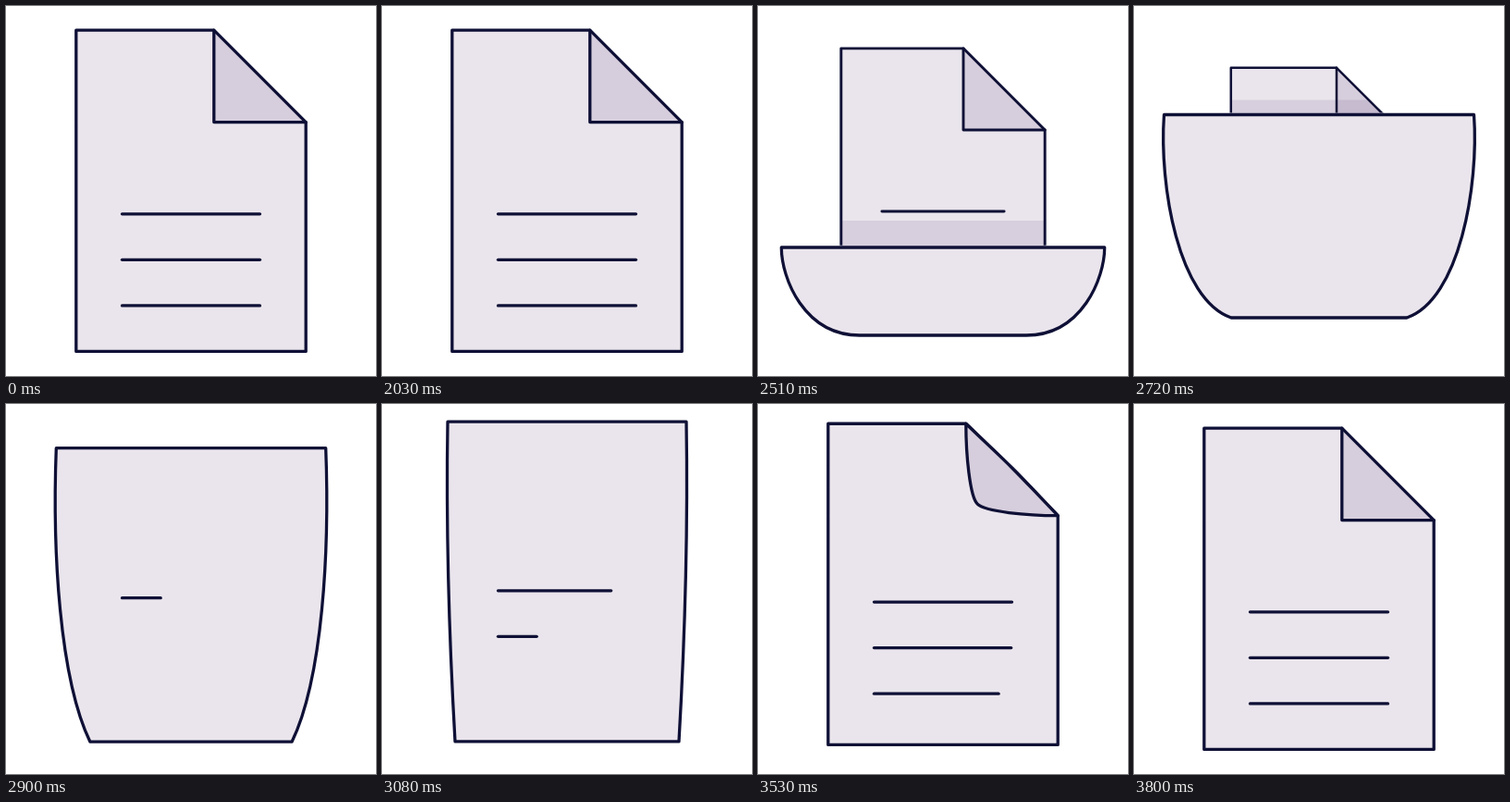
Animation, 400 px wide and 400 px high, one loop 3.83 s. Source, as an HTML page with a canvas:

```html
<!DOCTYPE html>
<html>
<head>
<meta charset="utf-8">
<style>
html, body { margin: 0; width: 100%; height: 100%; overflow: hidden; background: #fff; }
canvas { display: block; width: 400px; height: 400px; }
</style>
</head>
<body>
<canvas id="stage"></canvas>
<script>
const LOOP = 3830, START = 2030, STEP = 30;
const INK = '#0f1036', PAPER = '#eae5ec', FOLD = '#d6cedc', SHADE = 'rgba(100,70,130,.14)';
const CORNER = 99.4, TOP = 26.2, BOTTOM = 373.4, HALF = 124.2;

const canvas = document.getElementById('stage');
const ctx = canvas.getContext('2d');
const dpr = window.devicePixelRatio || 1;
canvas.width = canvas.height = 400 * dpr;

// Smooth track through [time, value] keys that never overshoots them.
function track(...keys) {
  const slope = i => (keys[i + 1][1] - keys[i][1]) / (keys[i + 1][0] - keys[i][0]);
  const tangent = keys.map((k, i) => {
    if (!i || i === keys.length - 1) return 0;
    const a = slope(i - 1), b = slope(i);
    return a * b <= 0 ? 0 : 2 * a * b / (a + b);
  });
  return t => {
    const last = keys.length - 1;
    if (t <= keys[0][0]) return keys[0][1];
    if (t >= keys[last][0]) return keys[last][1];
    let i = 0;
    while (t > keys[i + 1][0]) i++;
    const h = keys[i + 1][0] - keys[i][0], u = (t - keys[i][0]) / h, v = 1 - u;
    return keys[i][1] * (1 + 2 * u) * v * v + keys[i + 1][1] * (3 - 2 * u) * u * u
      + h * u * v * (tangent[i] * v - tangent[i + 1] * u);
  };
}

// Free edge and bottom of the turning sheet
const edgeY = track([2030, 373.4], [2150, 380], [2510, 261], [2720, 117.5], [2860, 57], [3080, 19.2],
  [3200, 11.2], [3320, 13.3], [3620, 23.9], [3800, TOP]);
const edgeHalf = track([2030, 124.2], [2150, 131], [2510, 174.7], [2620, 178], [2720, 167.5], [3080, 129], [3230, HALF]);
const footY = track([2030, 373.4], [2330, 371], [2510, 356], [2640, 341], [2720, 337], [2850, 356], [2970, 373.5],
  [3080, 364.8], [3200, 358.4], [3320, 360.4], [3620, 371.1], [3800, BOTTOM]);
const footHalf = track([2030, 124.2], [2330, 102], [2510, 90], [2600, 89], [2720, 95], [3080, 121], [3230, HALF]);
const bulgeTop = track([2510, 0], [2720, 5.5], [3080, 2], [3230, 0]);
const bulgeFoot = track([2030, 0], [2510, 60], [2720, 57], [3080, 6], [3230, 0]);
const lift = track([2510, 0], [2720, .09], [3080, .3]);
const shadow = track([2030, 0], [2300, 22], [2500, 29], [2720, 16], [2980, 0]);
// Corner: outline position and the tip folding over it
const outline = track([3110, 0], [3320, .46], [3440, .8], [3560, 1]);
const tip = track([3320, .46], [3440, 1.15], [3530, 1.75], [3620, 2]);
// Text rules
const grow = track([0, 0], [60, .08], [120, .28], [180, .445], [300, .82], [360, .88], [540, .99], [640, 1]);
const ruleShift = track([2780, -12], [3080, -23], [3220, -26], [3320, -25], [3620, -5], [3800, 0]);
const RULES = [224.8, 274.3, 323.9];

function rule(y, part) {
  ctx.beginPath();
  ctx.moveTo(125.5, y);
  ctx.lineTo(125.5 + 149 * part, y);
  ctx.stroke();
}

function paint(fill) {
  ctx.fillStyle = fill;
  ctx.fill();
  ctx.stroke();
}

function clipAbove(y, draw) {
  ctx.save();
  ctx.beginPath();
  ctx.rect(-200, -200, 800, y + 200);
  ctx.clip();
  draw();
  ctx.restore();
}

// Seven points from the top edge to the right edge; q: 0 is square, 1 is cut, 2 is folded in.
function cornerPoints(q, x, y) {
  const flip = q > 1, s = flip ? 2 - q : q, mid = CORNER / 2 * s;
  const k = 16.6 * Math.min(1, s * 2);
  const half = [[CORNER, 0], [CORNER - 33.1, 33.1 * Math.max(0, (s - .46) / .54)], [mid + k, mid - k], [mid, mid]];
  const all = half.concat(half.slice(0, 3).reverse().map(([a, b]) => [b, a]));
  return all.map(([a, b]) => flip ? [x - CORNER + b, y + CORNER - a] : [x - a, y + b]);
}

function curve(p) {
  for (let i = 1; i < 7; i += 3) ctx.bezierCurveTo(...p[i], ...p[i + 1], ...p[i + 2]);
}

function drawPage(t) {
  const dt = Math.max(0, t - START), s = 1 - .113 * (dt / 480) ** 2;
  const edge = edgeY(t), turned = edge < footY(t) - 2;
  const toLocal = y => 200 + (y - 200) / s;
  const low = dt ? toLocal(edge) : BOTTOM, wide = dt ? edgeHalf(t) / s : HALF;
  const bend = Math.min(80, dt * .28);

  function shape() {
    ctx.beginPath();
    ctx.moveTo(200 + HALF - CORNER, TOP);
    ctx.lineTo(200 - HALF, TOP);
    if (turned) {
      ctx.lineTo(200 - HALF, BOTTOM);
      ctx.lineTo(200 + HALF, BOTTOM);
    } else {
      ctx.lineTo(200 - HALF, low - bend);
      ctx.quadraticCurveTo(200 - HALF, low - bend * .4, 200 - wide, low);
      ctx.lineTo(200 + wide, low);
      ctx.quadraticCurveTo(200 + HALF, low - bend * .4, 200 + HALF, low - bend);
    }
    ctx.lineTo(200 + HALF, TOP + CORNER);
    ctx.closePath();
  }

  function body() {
    shape();
    ctx.fillStyle = PAPER;
    ctx.fill();
    ctx.beginPath();
    ctx.moveTo(200 + HALF - CORNER, TOP);
    ctx.lineTo(200 + HALF - CORNER, TOP + CORNER);
    ctx.lineTo(200 + HALF, TOP + CORNER);
    ctx.closePath();
    ctx.fillStyle = FOLD;
    ctx.fill();
    if (turned) {
      shape();
      ctx.save();
      ctx.clip();
      ctx.fillStyle = SHADE;
      ctx.fillRect(0, low - shadow(t) / s, 400, shadow(t) / s);
      ctx.restore();
    }
  }

  function lines() {
    ctx.beginPath();
    ctx.moveTo(200 + HALF - CORNER, TOP);
    ctx.lineTo(200 + HALF - CORNER, TOP + CORNER);
    ctx.lineTo(200 + HALF, TOP + CORNER);
    ctx.stroke();
    shape();
    ctx.stroke();
    RULES.forEach(y => rule(y, 1));
  }

  ctx.save();
  ctx.translate(200, 200);
  ctx.scale(s, s);
  ctx.translate(-200, -200);
  if (turned) {
    clipAbove(low, body);
    clipAbove(low - 2.5, lines);
  } else {
    body();
    lines();
  }
  ctx.restore();
  return turned;
}

function drawSheet(t) {
  const y0 = edgeY(t), y1 = footY(t), w0 = edgeHalf(t), w1 = footHalf(t), h = y1 - y0;
  const q = outline(t), r = tip(t), right = 200 + w0;
  const c1 = w0 + bulgeTop(t), y2 = y0 + h * .35;
  const c2 = w1 + bulgeFoot(t), y3 = y1 - h * lift(t);
  const corner = cornerPoints(q, right, y0);

  ctx.beginPath();
  ctx.moveTo(200 - w0, y0);
  if (q > 0) {
    ctx.lineTo(...corner[0]);
    curve(corner);
  } else {
    ctx.lineTo(right, y0);
  }
  ctx.bezierCurveTo(200 + c1, q > 0 ? Math.max(y2, y0 + CORNER) : y2, 200 + c2, y3, 200 + w1, y1);
  ctx.lineTo(200 - w1, y1);
  ctx.bezierCurveTo(200 - c2, y3, 200 - c1, y2, 200 - w0, y0);
  ctx.closePath();
  paint(PAPER);

  if (q > 0 && r > q + .02) {
    ctx.beginPath();
    ctx.moveTo(...corner[0]);
    curve(corner);
    const inner = cornerPoints(r, right, y0);
    // The folded side is mirrored, so its ends may already run in reverse.
    if (Math.hypot(inner[0][0] - corner[6][0], inner[0][1] - corner[6][1]) > 1) inner.reverse();
    curve(inner);
    ctx.closePath();
    paint(FOLD);
  }

  RULES.forEach((y, i) => {
    const part = grow(t - 2780 - 180 * i);
    if (part > 0) rule(y + ruleShift(t), part);
  });
}

function draw(now) {
  let t = now % LOOP;
  t = t < START ? 0 : START + Math.floor((t - START) / STEP) * STEP;
  if (t >= 3800) t = 0;
  ctx.setTransform(dpr, 0, 0, dpr, 0, 0);
  ctx.fillStyle = '#fff';
  ctx.fillRect(0, 0, 400, 400);
  ctx.strokeStyle = INK;
  ctx.lineWidth = 3.3;
  ctx.lineCap = ctx.lineJoin = 'round';
  const turned = t > 2860 || drawPage(t);
  if (turned) drawSheet(t);
}

const begin = performance.now();
function tick() {
  draw(performance.now() - begin);
  requestAnimationFrame(tick);
}
tick();
</script>
</body>
</html>
```
